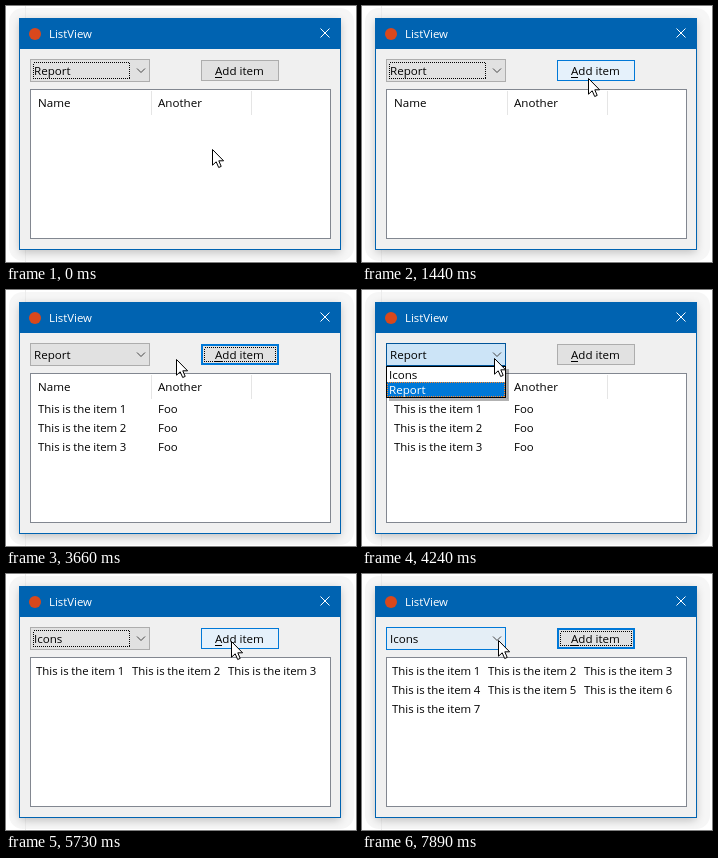
Write an HTML page that moves like this. It is 350 px wide and 256 px high and loops after 8000 ms.

```html
<!DOCTYPE html>
<html lang="en">
<head>
<meta charset="utf-8">
<title>ListView</title>
<style>
  html, body { margin: 0; width: 100%; height: 100%; overflow: hidden; background: #fff; }
  svg { display: block; width: 350px; height: 256px; }
  text { font: 11.6px "Open Sans", "Noto Sans", sans-serif; fill: #000; white-space: pre; }
  .item { font-size: 11.4px; word-spacing: -.3px; }
  .crisp { shape-rendering: crispEdges; }
  .focus { fill: none; stroke: #000; stroke-dasharray: 1 1; }
</style>
</head>
<body>
<svg viewBox="0 0 350 256" xmlns="http://www.w3.org/2000/svg">
  <defs>
    <filter id="blur" x="-10%" y="-10%" width="120%" height="120%">
      <feGaussianBlur stdDeviation="5"/>
    </filter>
  </defs>
  <rect width="350" height="256" fill="#fff"/>
  <rect x="3" y="2" width="345" height="253" rx="14" fill="#f6f6f6"/>
  <path class="crisp" d="M19.5 0V256" stroke="#ececec"/>
  <rect x="14" y="15" width="320" height="231" fill="#000" opacity=".24" filter="url(#blur)"/>

  <g class="crisp">
    <rect x="13" y="12" width="322" height="232" fill="#0063b1"/>
    <rect x="14" y="43" width="320" height="200" fill="#f0f0f0"/>
    <rect x="24.5" y="83.5" width="300" height="149" fill="#fff" stroke="#828790"/>
  </g>
  <circle cx="29" cy="28" r="6" fill="#d9481c"/>
  <text x="43" y="32" style="fill:#fff;font-size:11.4px">ListView</text>
  <path d="M314.5 22.5l9 9m0-9l-9 9" stroke="#fff" fill="none"/>

  <g id="header">
    <rect id="headHot" class="crisp" y="85" height="24" fill="#d9ebf9"/>
    <path class="crisp" d="M145.5 85V109M245.5 85V109" stroke="#e5e5e5"/>
    <text x="32" y="101">Name</text>
    <text x="152" y="101">Another</text>
  </g>
  <g id="list"></g>

  <rect id="combo" class="crisp" x="24.5" y="53.5" width="119" height="22"/>
  <rect id="comboFocus" class="crisp focus" x="27.5" y="56.5" width="96" height="16"/>
  <text id="choice" x="28" y="69"></text>
  <path d="M131 62.5l4 4l4-4" fill="none" stroke="#444"/>

  <rect id="button" class="crisp"/>
  <rect id="buttonFocus" class="crisp focus" x="198.5" y="57.5" width="71" height="14"/>
  <text x="209" y="69">Add item</text>
  <path class="crisp" d="M209 71.5h7" stroke="#000"/>

  <g id="popup">
    <rect x="27" y="79" width="120" height="32" fill="#000" opacity=".3"/>
    <g class="crisp">
      <rect x="24.5" y="76.5" width="119" height="31" fill="#fff" stroke="#000"/>
      <rect id="pick" x="25" width="118" height="15" fill="#0078d7"/>
      <rect id="pickFocus" class="focus" x="25.5" width="117" height="14" style="stroke:#ff8728"/>
    </g>
    <text id="optIcons" x="27" y="89">Icons</text>
    <text id="optReport" x="27" y="104">Report</text>
  </g>

  <path id="cursor" d="M.5.5V16.2L4.2 12.8L6.7 18.5L9.2 17.4L6.8 11.8H11.6Z" fill="#fff" stroke="#000"/>
</svg>
<script>
const LOOP = 8000;
const FOCUS_BUTTON = 1870, OPEN = 4237, PICK = 5100, REFOCUS = 6010;
const added = [2010, 2723, 3050, 6194, 6562, 6930, 7200];
const presses = [[1870, 2010], [2560, 2723], [2887, 3050], [6010, 6194], [6378, 6562], [6746, 6930]];

const both = p => p * p * (3 - 2 * p);
const easeIn = p => p * p;
const easeOut = p => p * (2 - p);

// The pointer jumps through evenly timed steps along each move.
const moves = [
  { from: 460, to: 1300, steps: 7, x: 226, y: 72, ease: both },
  { from: 3213, to: 3660, steps: 4, x: 170, y: 69, ease: easeIn },
  { from: 3804, to: 4093, steps: 3, x: 132, y: 68, ease: easeOut },
  { from: 4381, to: 4670, steps: 3, x: 127, y: 77, ease: both },
  { from: 5226, to: 5604, steps: 4, x: 225, y: 67, ease: both },
  { from: 7338, to: 7890, steps: 5, x: 136, y: 66, ease: both }
];

const $ = id => document.getElementById(id);
const set = (id, attrs) => {
  for (const k in attrs) $(id).setAttribute(k, attrs[k]);
};
const show = (id, on) => set(id, { visibility: on ? "visible" : "hidden" });
const within = (p, x, y, w, h) => p.x >= x && p.x < x + w && p.y >= y && p.y < y + h;

function pointer(t) {
  let x = 206, y = 143;
  for (const m of moves) {
    if (t < m.from) break;
    const n = Math.floor((t - m.from) / (m.to - m.from) * (m.steps - 1) + 1e-6) + 1;
    const p = m.ease(Math.min(1, n / m.steps));
    x += (m.x - x) * p;
    y += (m.y - y) * p;
  }
  return { x: Math.round(x), y: Math.round(y) };
}

let listKey = "";
function drawList(count, icons) {
  const key = count + "/" + icons;
  if (key === listKey) return;
  listKey = key;
  const label = (x, y, s) => `<text class="item" x="${x}" y="${y}">${s}</text>`;
  let out = "";
  for (let i = 0; i < count; i++) {
    const name = "This is the item " + (i + 1);
    out += icons
      ? label(30 + i % 3 * 96, 101 + Math.floor(i / 3) * 19, name)
      : label(32, 122.5 + i * 19, name) + label(152, 122.5 + i * 19, "Foo");
  }
  $("list").innerHTML = out;
}

function drawButton(p, t, focused) {
  const hot = within(p, 195, 54, 78, 21);
  const down = presses.some(([a, b]) => t >= a && t < b);
  const thick = focused && !hot ? 2 : 1;
  set("button", {
    x: 195 + thick / 2, y: 54 + thick / 2, width: 78 - thick, height: 21 - thick,
    "stroke-width": thick,
    fill: down ? "#cce4f7" : hot ? "#e5f1fb" : "#e1e1e1",
    stroke: down ? "#005499" : hot || focused ? "#0078d7" : "#adadad"
  });
  show("buttonFocus", focused);
}

function drawCombo(p, t, open, icons, focused) {
  const hot = within(p, 24, 53, 120, 23);
  set("combo", {
    fill: open ? "#cce4f7" : hot ? "#e4eef6" : "#e1e1e1",
    stroke: open ? "#005499" : hot ? "#0078d7" : "#adadad"
  });
  show("comboFocus", focused && !open);
  $("choice").textContent = icons ? "Icons" : "Report";

  show("popup", open);
  const first = p.y >= 77;
  set("pick", { y: first ? 77 : 92 });
  set("pickFocus", { y: first ? 77.5 : 92.5 });
  $("optIcons").style.fill = first ? "#fff" : "#000";
  $("optReport").style.fill = first ? "#000" : "#fff";
}

function draw(t) {
  const p = pointer(t);
  const icons = t >= PICK;
  const open = t >= OPEN && t < PICK;
  const comboFocused = t < FOCUS_BUTTON || (t >= OPEN && t < REFOCUS);

  const second = p.x > 145;
  show("header", !icons);
  set("headHot", {
    x: second ? 146 : 25,
    width: second ? 99 : 120,
    opacity: !open && within(p, 25, 85, 220, 24) ? 1 : 0
  });
  drawList(added.filter(a => t >= a).length, icons);
  drawCombo(p, t, open, icons, comboFocused);
  drawButton(p, t, !comboFocused);
  set("cursor", { transform: `translate(${p.x} ${p.y})` });
}

const start = performance.now();
function tick() {
  draw((performance.now() - start) % LOOP);
  requestAnimationFrame(tick);
}
tick();
</script>
</body>
</html>
```
